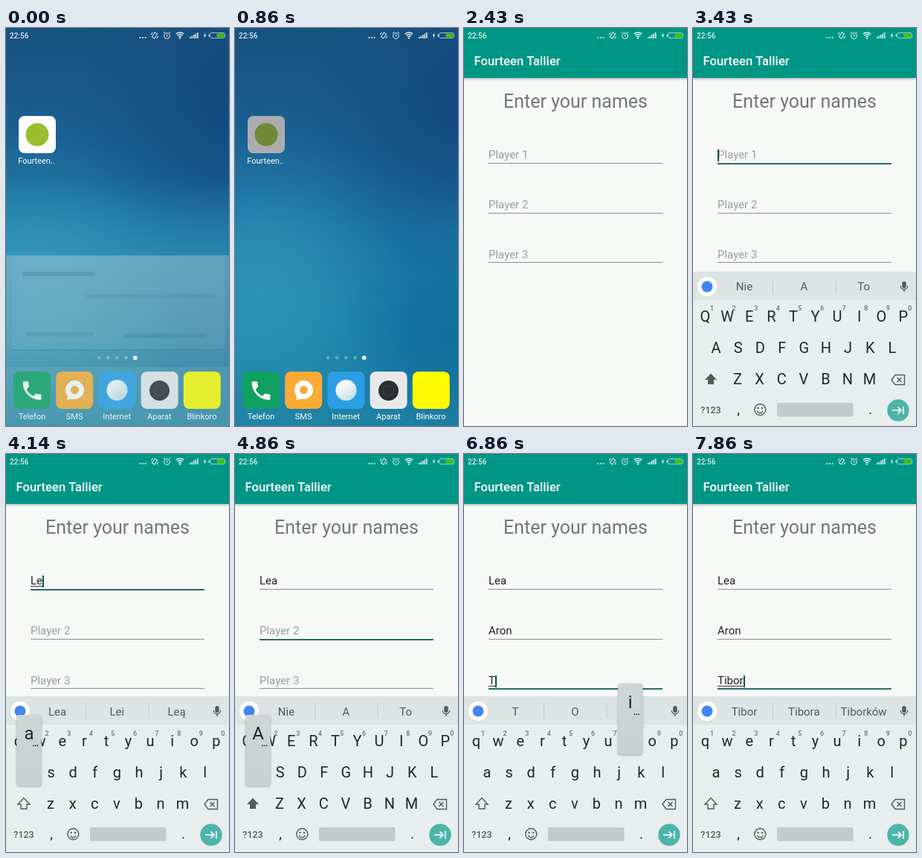
These frames come from a looping animation (300x534 px, 8 s). An HTML page with a canvas:

```html
<!DOCTYPE html>
<html lang="en">
<head>
<meta charset="utf-8">
<title>Name entry</title>
<style>
html, body { margin: 0; width: 100%; height: 100%; overflow: hidden; background: #17699a; }
canvas { display: block; width: 100vw; height: 100vh; }
</style>
</head>
<body>
<canvas id="stage"></canvas>
<script>
const W = 300, H = 534, LOOP = 8000;
const canvas = document.getElementById('stage');
const dpr = window.devicePixelRatio || 1;
canvas.width = W * dpr;
canvas.height = H * dpr;
const c = canvas.getContext('2d');

const TITLE = 'Fourteen Tallier';
const DARK = '#07544f', INK = '#1c282e', GREY = '#4f5b60', PAPER = '#f7f9f7';

// Each field: when it gains focus, when its keys go down, its suggestions
const fields = [
  { focus: 3000, presses: [3660, 3860, 4060], words: ['Lea', 'Lei', 'Leą'] },
  { focus: 4340, presses: [4810, 5080, 5360, 5640], words: ['Aron', 'Arona', 'Aronem'] },
  { focus: 6180, presses: [6500, 6810, 7040, 7260, 7480], words: ['Tibor', 'Tibora', 'Tiborków'] }
];
const TYPE_LAG = 100, POPUP = 170;
const nextPresses = [4250, 6090];
const rows = [['qwertyuiop', 16.5, 385], ['asdfghjkl', 31, 427], ['zxcvbnm', 60, 469]];
const PITCH = 29.6;

const clamp = v => Math.max(0, Math.min(1, v));
const easeOut = v => 1 - Math.pow(1 - clamp(v), 3);
const mix = (a, b, p) => a + (b - a) * p;

function rect(x, y, w, h, fill) {
  c.fillStyle = fill;
  c.fillRect(x, y, w, h);
}
function round(x, y, w, h, r, fill) {
  c.beginPath();
  c.roundRect(x, y, w, h, r);
  c.fillStyle = fill;
  c.fill();
}
function disc(x, y, r, fill) {
  c.beginPath();
  c.arc(x, y, r, 0, Math.PI * 2);
  c.fillStyle = fill;
  c.fill();
}
function ring(x, y, r, color, width, from = 0, to = Math.PI * 2) {
  c.beginPath();
  c.arc(x, y, r, from, to);
  c.strokeStyle = color;
  c.lineWidth = width;
  c.stroke();
}
function poly(points, color, width, close) {
  c.beginPath();
  points.forEach(([x, y]) => c.lineTo(x, y));
  if (close) c.closePath();
  if (width) {
    c.strokeStyle = color;
    c.lineWidth = width;
    c.stroke();
  } else {
    c.fillStyle = color;
    c.fill();
  }
}
function text(s, x, y, size, fill, align = 'left', weight = 400) {
  c.font = `${weight} ${size}px Roboto, "Noto Sans", sans-serif`;
  c.textAlign = align;
  c.fillStyle = fill;
  c.fillText(s, x, y);
}
function stops(g, colors) {
  colors.forEach((col, i) => g.addColorStop(i / (colors.length - 1), col));
  return g;
}
const linear = (x0, y0, x1, y1, ...colors) => stops(c.createLinearGradient(x0, y0, x1, y1), colors);

// Soft spot of an "r,g,b" tint over the whole stage
function glow(x, y, r, rgb, alpha) {
  const colors = [1, 0.75, 0.28, 0].map(a => `rgba(${rgb},${a * alpha})`);
  rect(0, 0, W, H, stops(c.createRadialGradient(x, y, 0, x, y, r), colors));
}

function statusBar() {
  const w = 'rgba(255,255,255,.85)';
  text('22:56', 5, 14, 10, w, 'left', 500);
  for (let i = 0; i < 3; i++) rect(179.5 + i * 3.6, 12, 1.8, 1.8, w);
  // Vibrate
  c.save();
  c.translate(200, 10);
  c.rotate(0.6);
  c.strokeStyle = w;
  c.lineWidth = 1;
  c.strokeRect(-2, -3.5, 4, 7);
  poly([[-4.5, -2], [-4.5, 2]], w, 1);
  poly([[4.5, -2], [4.5, 2]], w, 1);
  c.restore();
  // Alarm
  ring(216.5, 10.5, 3.8, w, 1.1);
  poly([[216.5, 8.5], [216.5, 11], [218, 11]], w, 0.9);
  poly([[211.8, 7], [214, 5.2]], w, 1);
  poly([[221.2, 7], [219, 5.2]], w, 1);
  // Wireless
  for (let r = 2.8; r < 9; r += 2.6) ring(234, 14, r, w, 1.5, -2.3, -0.84);
  disc(234, 13.6, 1.2, w);
  for (let i = 0; i < 5; i++) rect(247 + i * 2.5, 12 - i * 1.5, 1.6, 2 + i * 1.5, w);
  poly([[268.4, 6], [265.5, 10.6], [267.4, 10.6], [266.6, 14], [269.6, 9.3], [267.6, 9.3]], w);
  // Battery
  c.beginPath();
  c.roundRect(274.5, 6.5, 20, 7, 2.5);
  c.strokeStyle = 'rgba(255,255,255,.6)';
  c.lineWidth = 1;
  c.stroke();
  rect(272.6, 8.5, 1.4, 3, w);
  round(283.5, 7.6, 10, 4.8, 1, '#43c20a');
}

const handset = new Path2D('M6.6 10.8c1.4 2.8 3.8 5.1 6.6 6.6l2.2-2.2c.3-.3.7-.4 1-.2 1.1.4 2.3.6 3.6.6.5 0 1 .4 1 1V20c0 .6-.5 1-1 1C10.6 21 3 13.4 3 4c0-.5.5-1 1-1h3.5c.6 0 1 .5 1 1 0 1.2.2 2.5.6 3.6.1.3 0 .7-.3 1z');

function dock() {
  const apps = [['Telefon', '#10a161'], ['SMS', '#fbab34'], ['Internet', '#2b9ee6'], ['Aparat', '#e9e9ea'], ['Blinkoro', '#fffb05']];
  apps.forEach(([name, color], i) => {
    round(10 + i * 57.2, 461, 50, 50, 8, color);
    text(name, 35 + i * 57.1, 524.8, 11, '#fff', 'center');
  });
  c.save();
  c.translate(18.5, 470);
  c.scale(1.38, 1.38);
  c.fillStyle = '#fff';
  c.fill(handset);
  c.restore();
  ring(92.5, 485.5, 9, '#fff', 7);
  poly([[83, 489], [82.5, 499], [92, 497]], '#fff');
  disc(149.5, 486, 14, linear(140, 474, 160, 498, '#ffffff', '#e4f0f2', '#bcdde6'));
  disc(206.5, 486.5, 13.5, '#2b2f31');
  ring(206.5, 486.5, 7, '#3c3936', 1.5);
}

// Previous panel, left behind as a pale veil
function ghostPanel(alpha) {
  c.save();
  c.globalAlpha = alpha;
  rect(0, 205, W, 100, linear(0, 205, 0, 305, 'rgba(60,160,200,0)', 'rgba(60,155,190,.45)'));
  rect(0, 305, W, 229, linear(0, 305, 0, H, 'rgba(150,195,205,.55)', 'rgba(135,185,195,.48)', 'rgba(100,165,180,.3)'));
  round(8, 306, 286, 126, 3, 'rgba(165,205,210,.12)');
  rect(8, 431, 286, 1.5, 'rgba(30,130,130,.35)');
  rect(22, 327, 98, 6, 'rgba(50,110,130,.25)');
  rect(108, 357, 172, 6, 'rgba(70,130,155,.2)');
  rect(26, 408, 92, 6, 'rgba(50,130,120,.18)');
  rect(160, 410, 110, 6, 'rgba(30,110,160,.18)');
  c.restore();
}

function homeScreen(t) {
  rect(0, 0, W, H, linear(0, 0, 0, H, '#18527f', '#1a5f91', '#1a73a3', '#187da8', '#1f82a2'));
  glow(30, 350, 210, '62,168,196', 0.55);
  glow(300, 130, 210, '14,56,112', 0.5);
  glow(290, 420, 150, '8,92,146', 0.45);

  const ghost = 1 - clamp((t - 60) / 700);
  ghostPanel(ghost);

  round(17, 118, 50, 50, 8, '#fdfdfd');
  disc(42, 143, 15.5, '#97bf2c');
  if (t >= 780 && t < 1240) round(17, 118, 50, 50, 8, 'rgba(60,60,70,.42)');
  text(TITLE.slice(0, 8) + '..', 41, 181.5, 11, '#fff', 'center');

  for (let i = 0; i < 5; i++) disc(125 + i * 12.2, 442.5, i === 4 ? 2.8 : 2.4, i === 4 ? '#fff' : 'rgba(190,220,235,.4)');
  dock();
  rect(0, 455, W, 79, `rgba(140,190,200,${0.22 * ghost})`);
}

const typed = (f, t) => f.words[0].slice(0, f.presses.filter(p => t >= p + TYPE_LAG).length);

function activeField(t) {
  let n = -1;
  fields.forEach((f, i) => { if (t >= f.focus) n = i; });
  return n;
}

function cursorOn(f, t) {
  const since = f.presses.map(p => p + TYPE_LAG).filter(p => p <= t).pop() || f.focus;
  return (t - since) % 1000 < 500;
}

function form(t) {
  rect(0, 0, W, H, PAPER);
  rect(0, 67, W, 4, linear(0, 67, 0, 71, 'rgba(0,0,0,.22)', 'rgba(0,0,0,0)'));
  rect(0, 0, W, 67, '#009685');
  text(TITLE, 13.5, 50, 16.67, '#fff', 'left', 500);
  text('Enter your names', 150, 107, 25, '#757776', 'center');

  const active = activeField(t);
  fields.forEach((f, i) => {
    const base = 175.3 + i * 66.7, s = typed(f, t), on = i === active;
    text(s || `Player ${i + 1}`, 33, base, 15, s ? '#222' : '#9b9d9c');
    const w = s ? c.measureText(s).width : 0;
    const line = Math.round(base + 5.7);
    if (on) rect(33, line + 0.3, 234, 1.7, DARK);
    else rect(33, line, 234, 1, '#8c8e8d');
    if (!on) return;
    if (s) rect(33, Math.round(base + 2), w, 1, '#333');
    if (cursorOn(f, t)) rect(Math.round(33 + w), Math.round(base - 12), 2, 16, DARK);
  });
}

function keyboard(t) {
  const f = fields[Math.max(0, activeField(t))], s = typed(f, t), upper = !s;
  const cased = k => upper ? k.toUpperCase() : k;
  rect(0, 325, W, 220, '#e8eded');
  rect(0, 325, W, 38, '#dee3e4');

  // Suggestions
  disc(19, 345, 13, '#fff');
  disc(19, 345, 7.5, '#4285f4');
  const words = s.length > 1 ? f.words : s ? [s, 'O', 'I'] : ['Nie', 'A', 'To'];
  words.forEach((word, i) => text(word, 69 + i * 80.3, 350.5, 15, GREY, 'center'));
  rect(107, 335, 1, 20, '#c2c8ca');
  rect(191.5, 335, 1, 20, '#c2c8ca');
  round(281.3, 338, 5.4, 9, 2.7, GREY);
  ring(284, 344, 4.7, GREY, 1.3, 0, Math.PI);
  rect(283.3, 348.5, 1.4, 3.5, GREY);

  rows.forEach(([keys, x, y], r) => [...keys].forEach((k, i) => {
    const kx = x + i * PITCH;
    text(cased(k), kx, y + 6.8, 20, INK, 'center');
    if (r === 0) text((i + 1) % 10, kx + 9, y - 7.5, 9, '#69757a', 'center', 500);
  }));

  // Shift and delete
  const arrow = [[24, 461.5], [32, 470], [28, 470], [28, 476], [20, 476], [20, 470], [16, 470]];
  poly(arrow, GREY, upper ? 0 : 1.4, true);
  poly([[267, 470], [272, 463.5], [284.5, 463.5], [284.5, 476.5], [272, 476.5]], GREY, 1.4, true);
  poly([[274.5, 467], [280.5, 473]], GREY, 1.4);
  poly([[280.5, 467], [274.5, 473]], GREY, 1.4);

  // Bottom row
  text('?123', 24, 514.8, 12.5, GREY, 'center', 500);
  text(',', 61, 516, 19, INK, 'center');
  ring(90.3, 510, 7.5, GREY, 1.4);
  disc(87.6, 508, 1.2, GREY);
  disc(93, 508, 1.2, GREY);
  ring(90.3, 510.5, 4, GREY, 1.4, 0.3, Math.PI - 0.3);
  round(113, 501, 102.5, 18.5, 2, '#c4c9cb');
  text('.', 238.5, 516, 19, INK, 'center');
  nextPresses.forEach(p => {
    const q = (t - p) / 340;
    if (q > 0 && q < 1) disc(276, 511, mix(12, 24, easeOut(q)), `rgba(90,110,115,${0.28 * (1 - q)})`);
  });
  disc(276, 511, 14.7, '#4db4a9');
  poly([[268, 511], [279.5, 511]], '#fff', 1.7);
  poly([[275.5, 506.5], [280, 511], [275.5, 515.5]], '#fff', 1.7);
  poly([[283, 506], [283, 516]], '#fff', 1.7);
}

function keyPopups(t) {
  fields.forEach(f => f.presses.forEach((p, n) => {
    if (t < p || t >= p + POPUP) return;
    const k = f.words[0][n], low = k.toLowerCase();
    const [keys, x0, y] = rows.find(r => r[0].includes(low));
    const x = x0 + keys.indexOf(low) * PITCH, top = y - 77;
    c.save();
    c.shadowColor = 'rgba(0,0,0,.3)';
    c.shadowBlur = 3 * dpr;
    c.shadowOffsetY = dpr;
    round(x - 16.5, top, 33, 95, 3, linear(0, top, 0, top + 95, '#d0d5d6', '#cacfd1'));
    c.restore();
    text(k, x, top + 32.5, 24, INK, 'center');
    for (let i = 0; i < 3; i++) rect(x + 5 + i * 2.8, top + 40.5, 1.5, 1.5, INK);
  }));
}

function draw(t) {
  c.setTransform(dpr, 0, 0, dpr, 0, 0);
  if (t < 1730) {
    homeScreen(t);
    if (t >= 1240) {
      const p = easeOut((t - 1240) / 480), px = Math.min(1, p * 1.04);
      const x = mix(17, 0, px), y = mix(118, 0, p);
      c.globalAlpha = clamp((t - 1230) / 100);
      round(x, y, mix(67, W, px) - x, mix(168, H, p) - y, 8 * (1 - p), PAPER);
      c.globalAlpha = 1;
    }
  } else {
    rect(0, 0, W, H, PAPER);
    c.globalAlpha = clamp((t - 1930) / 220);
    form(t);
    c.globalAlpha = 1;
  }
  if (t >= 3100) {
    c.save();
    c.translate(0, 209 * (1 - easeOut((t - 3100) / 420)));
    keyboard(t);
    keyPopups(t);
    c.restore();
  }
  statusBar();
}

const start = performance.now();
function frame() {
  draw((performance.now() - start) % LOOP);
  requestAnimationFrame(frame);
}
frame();
</script>
</body>
</html>
```
